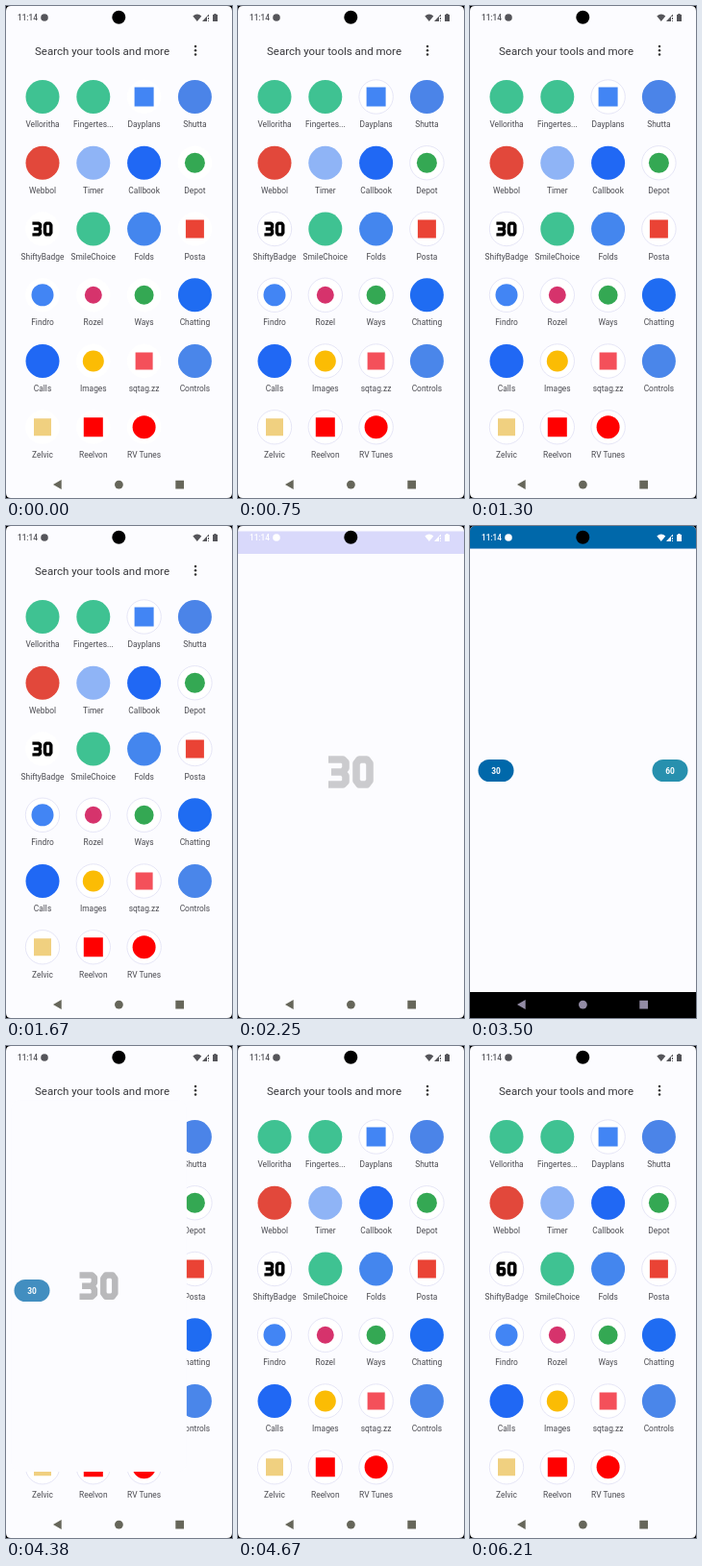
An HTML page for the animation above (6.29 s loop, 235 px wide and 512 px high).

```html
<!DOCTYPE html>
<html lang="en">
<head>
<meta charset="utf-8">
<title>Launcher icon switch</title>
<style>
  html, body { margin: 0; width: 100%; height: 100%; overflow: hidden; background: #fcfcff; }
  svg { display: block; width: 100vw; height: 100vh; font-family: Roboto, sans-serif; }
  .label { font-size: 8.4px; fill: #4a4a50; text-anchor: middle; }
  .button { font-size: 8.4px; font-weight: 700; fill: #fff; text-anchor: middle; }
  .ring { fill: #fff; stroke: #dcdcf3; stroke-width: .7; }
  .digits { fill: none; stroke: #000; stroke-width: 7.6; stroke-linejoin: round; }
</style>
</head>
<body>
<svg viewBox="0 0 235 512" preserveAspectRatio="none">
  <defs>
    <clipPath id="windowClip"><rect id="windowShape"/></clipPath>
    <clipPath id="buttonClip"><rect x="189.5" y="243" width="37" height="23" rx="11.5"/></clipPath>
  </defs>
  <rect width="235" height="512" fill="#fcfcff"/>

  <g id="drawer">
    <text x="30" y="50.5" font-size="11.5" fill="#37373b">Search your tools and more</text>
    <g fill="#333"><circle cx="197" cy="42" r="1.25"/><circle cx="197" cy="46.3" r="1.25"/><circle cx="197" cy="50.6" r="1.25"/></g>
    <g id="icons"></g>
  </g>

  <g id="window" clip-path="url(#windowClip)">
    <rect width="235" height="512" fill="#fcfcff"/>
    <g id="splash" class="digits"></g>
    <g id="app">
      <g id="bar">
        <rect width="235" height="23.5" fill="#d9d9fb"/>
        <rect id="barBlue" width="235" height="23.5" fill="#0068aa"/>
      </g>
      <g id="buttons">
        <rect x="8.5" y="243" width="37" height="23" rx="11.5" fill="#0068aa"/>
        <rect x="189.5" y="243" width="37" height="23" rx="11.5" fill="#2790ae"/>
        <circle id="ripple" cx="208" cy="254.5" fill="#fff" clip-path="url(#buttonClip)"/>
        <text class="button" x="27" y="257.5">30</text>
        <text class="button" x="208" y="257.5">60</text>
      </g>
    </g>
  </g>

  <g id="status">
    <text x="12" y="15" font-size="8.2" font-weight="500">11:14</text>
    <circle cx="40" cy="12" r="3.8"/>
    <path d="M194.3 10.6Q198.8 6.6 203.3 10.6L198.8 16ZM204 16 211 8.5V11H209V16ZM210 12H211V14H210ZM210 15H211V16H210ZM215 9H216.3V8H218.6V9H220V16H215Z"/>
  </g>
  <circle cx="117.3" cy="11.8" r="7"/>
  <rect id="navBar" y="485" width="235" height="27"/>
  <g id="nav">
    <path d="M57.7 493V503L49 498ZM176.3 493.8H185V502.5H176.3Z"/>
    <circle cx="117.4" cy="498.1" r="4.4"/>
  </g>
  <path d="M0 0H5Q0 0 0 5ZM235 0H230Q235 0 235 5ZM0 512H5Q0 512 0 507ZM235 512H230Q235 512 235 507Z"/>
</svg>

<script>
const LOOP = 6290;
const OPEN = 1750, SPLASH = 2250, REVEAL = 2340, NAV_DARK = 2550;
const PRESS = 3640, CLOSE = 4250, CLOSED = 4640, ICON_SWAP = 5520;

// label, colour, and the mark on a white disc (none: a solid disc)
const apps = [
  ["Velloritha", "#3fc292"], ["Fingertes...", "#3fc292"], ["Dayplans", "#4285f4", "square", 20], ["Shutta", "#4b84e8"],
  ["Webbol", "#e2483b"], ["Timer", "#8fb4f6"], ["Callbook", "#2068f4"], ["Depot", "#34a853", "circle", 21],
  ["ShiftyBadge", "#000", "digits"], ["SmileChoice", "#3fc292"], ["Folds", "#4486ee"], ["Posta", "#ea4335", "square", 19],
  ["Findro", "#4285f4", "circle", 23], ["Rozel", "#d6336c", "circle", 18], ["Ways", "#34a853", "circle", 20], ["Chatting", "#1f6cf2"],
  ["Calls", "#2068f4"], ["Images", "#fbbc04", "circle", 22], ["sqtag.zz", "#f4505a", "square", 18], ["Controls", "#4a86ea"],
  ["Zelvic", "#f0d080", "square", 18], ["Reelvon", "#f00", "square", 20], ["RV Tunes", "#f00", "circle", 24]
];

const glyphs = {
  3: "M0 4H15L18 7V13L15 17L18 21V27L15 30H0M3 17H15",
  6: "M20 4H7L4 8V26L7 30H15L18 27V18L16 16H4",
  0: "M32 4H40L43 8V26L40 30H32L29 26V8Z"
};
const $ = id => document.getElementById(id);
const clamp = v => Math.max(0, Math.min(1, v));
const progress = (t, from, to) => clamp((t - from) / (to - from));
const easeOut = p => 1 - (1 - p) ** 3;
const easeInOut = p => p * p * (3 - 2 * p);
const mix = (a, b, p) => a + (b - a) * p;
const set = (id, attrs) => {
  for (const name in attrs) $(id).setAttribute(name, attrs[name]);
};
const place = (x, y, scale) => `translate(${x} ${y}) scale(${scale}) translate(-23.5 -17)`;

function iconMarkup([label, color, mark, size], i) {
  const x = 38 + i % 4 * 52.8, y = 94.5 + Math.floor(i / 4) * 68.75;
  let icon = `<circle cx="${x}" cy="${y}" r="17.5" fill="${color}"/>`;
  if (mark) icon = `<circle class="ring" cx="${x}" cy="${y}" r="17.7"/>`;
  if (mark === "circle") icon += `<circle cx="${x}" cy="${y}" r="${size / 2}" fill="${color}"/>`;
  if (mark === "square") icon += `<rect x="${x - size / 2}" y="${y - size / 2}" width="${size}" height="${size}" fill="${color}"/>`;
  if (mark === "digits") icon += `<g class="digits" transform="${place(x, y, .45)}"><path id="tens"/><path d="${glyphs[0]}"/></g>`;
  return `<g${mark === "digits" ? ' id="launchIcon"' : ""}>${icon}</g><text class="label" x="${x}" y="${y + 31.5}">${label}</text>`;
}

$("icons").innerHTML = apps.map(iconMarkup).join("");
$("splash").innerHTML = `<path d="${glyphs[3]}"/><path d="${glyphs[0]}"/>`;
const rings = document.querySelectorAll(".ring");
const launchRing = $("launchIcon").querySelector(".ring");

function drawWindow(t) {
  const closing = t >= CLOSE;
  const size = closing ? 1 - easeInOut(progress(t, CLOSE, CLOSED)) : easeOut(progress(t, OPEN, 2200));
  const visible = t >= OPEN && t < CLOSED;
  const x = mix(38, 117.5, size), y = mix(232, 256, size);
  const halfW = mix(17.5, 117.5, size), halfH = mix(17.5, 256, size);
  set("window", { visibility: visible ? "visible" : "hidden" });
  set("launchIcon", { visibility: visible ? "hidden" : "visible" });
  set("windowShape", { x: x - halfW, y: y - halfH, width: 2 * halfW, height: 2 * halfH, rx: mix(17.5, 5, size) });

  const reveal = easeInOut(progress(t, REVEAL, NAV_DARK));
  const splashOpacity = closing ? 1 - size : t < SPLASH ? 1 : .19 * (1 - reveal);
  set("splash", { transform: place(x, y, mix(.45, 1, size)), opacity: splashOpacity });
  set("app", { opacity: t < SPLASH ? 0 : closing ? size : 1 });
  set("bar", { transform: `translate(0 ${5.5 * (1 - reveal)})` });
  set("barBlue", { opacity: reveal });
  set("buttons", { opacity: reveal });

  const press = progress(t, PRESS, 4090);
  set("ripple", { r: 22 * easeOut(press), opacity: .3 * Math.min(1, 2 * (1 - press)) });
}

function draw(t) {
  const inApp = t >= SPLASH && t < CLOSE;
  const darkNav = t >= NAV_DARK && t < CLOSE;
  drawWindow(t);
  set("tens", { d: glyphs[t < ICON_SWAP ? 3 : 6] });
  set("status", { fill: inApp ? "#fff" : "#55555a" });
  set("navBar", { opacity: darkNav ? 1 : 0 });
  set("nav", { fill: darkNav ? "#938ca5" : "#66665a" });
  rings.forEach(ring => ring.style.strokeOpacity = t < 50 ? 0 : 1);
  if (t >= 1590 && t < OPEN) launchRing.style.strokeOpacity = 0;
}

const start = performance.now();
function tick() {
  draw((performance.now() - start) % LOOP);
  requestAnimationFrame(tick);
}
tick();
</script>
</body>
</html>
```
